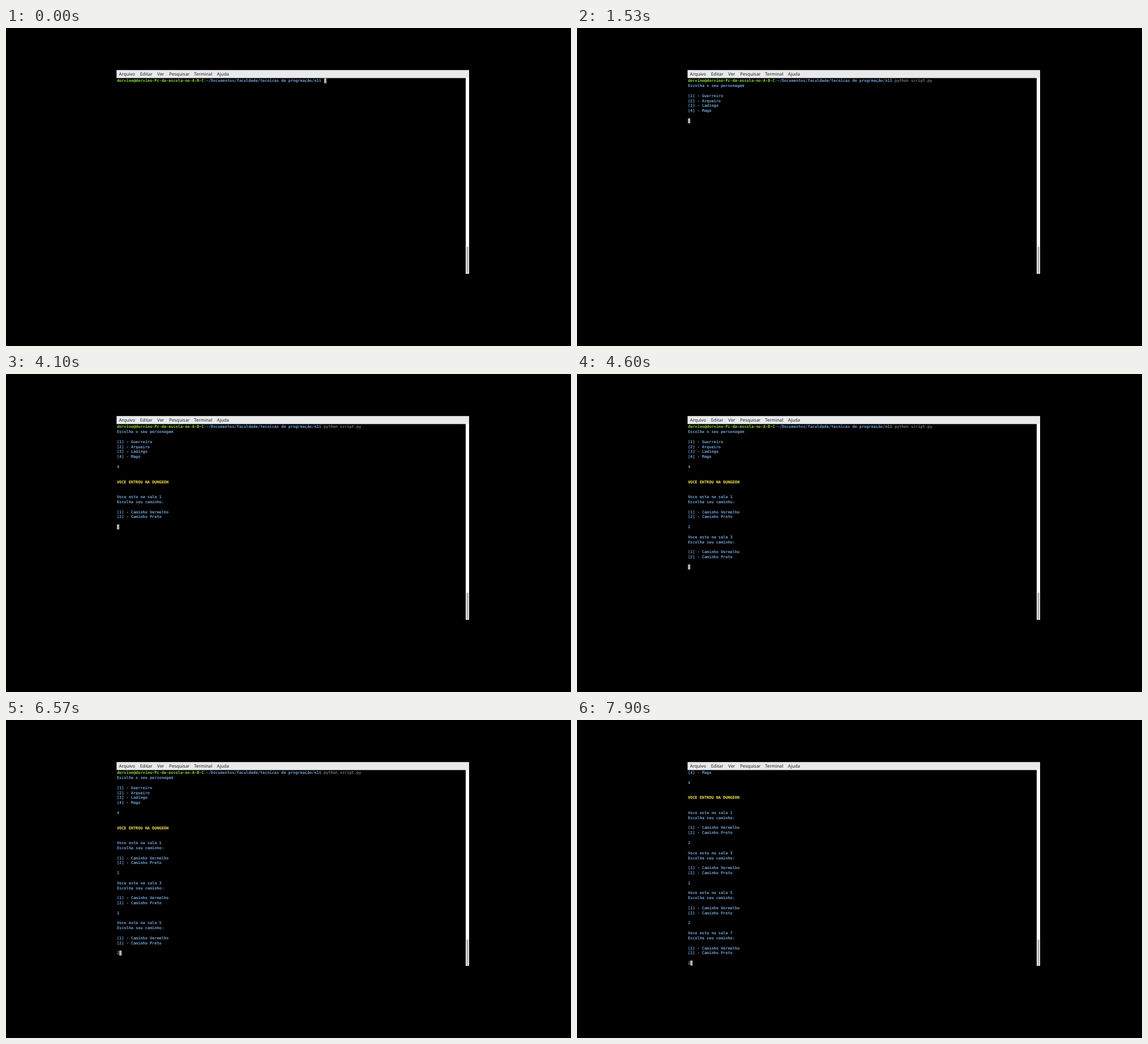
Animation of 998x561 px, one loop 8 s. Source, as an HTML page:

```html
<!DOCTYPE html>
<html lang="pt">
<head>
<meta charset="utf-8">
<title>Terminal</title>
<style>
  html, body { margin: 0; width: 100%; height: 100%; overflow: hidden; background: #000; }
  svg { display: block; width: 998px; height: 561px; }
  text { white-space: pre; text-rendering: geometricPrecision; }
  .menu { font: 7.9px "Noto Sans", "Open Sans", sans-serif; fill: #202020; }
  .row { font: bold 6.907px "DejaVu Sans Mono", monospace; fill: #729fcf; }
  .row .user { fill: #8ae234; }
  .row .plain { fill: #aaa; font-weight: normal; }
  .row.gold { fill: #fce94f; }
</style>
</head>
<body>
<svg id="stage" viewBox="0 0 998 561">
  <defs><clipPath id="view"><rect x="195" y="88.3" width="617" height="345.3"/></clipPath></defs>
  <rect width="998" height="561" fill="#000"/>
  <rect x="195.3" y="74.2" width="622.7" height="14.1" fill="#e8e9eb"/>
  <rect x="812" y="88" width="6" height="345.6" fill="#fff"/>
  <rect id="thumb" x="813.2" width="3.6" rx="1.8" fill="#b5b5b5"/>
  <g id="menu"></g>
  <g clip-path="url(#view)"><g id="screen"><rect id="cursor" fill="#b0b2af"/></g></g>
</svg>
<script>
const LOOP = 8000, CELL = 4.158, LINE = 8.837, LEFT = 195.9, TOP = 88.6;
const SCROLL_AT = 6600, SCROLL_ROWS = 6, THUMB_AT = 6500;
const $ = id => document.getElementById(id);

function add(parent, tag, attrs, content = "") {
  const el = document.createElementNS("http://www.w3.org/2000/svg", tag);
  for (const key in attrs) el.setAttribute(key, attrs[key]);
  el.textContent = content;
  parent.appendChild(el);
  return el;
}

[["Arquivo", 199.4], ["Editar", 236.7], ["Ver", 267.1], ["Pesquisar", 288.1],
 ["Terminal", 332], ["Ajuda", 372.6]].forEach(([label, x]) =>
  add($("menu"), "text", { class: "menu", x, y: 83.9 }, label));

const shown = [];
function print(row, at, content, style = "") {
  const el = add($("screen"), "text",
    { class: "row " + style, x: LEFT, y: TOP + row * LINE + 6.7 }, content);
  shown.push({ el, at });
  return el;
}

const prompt = print(0, 0, "");
[["user", "dorvino@dorvino-Pc-da-escola-no-A-B-C"], ["plain", ":"],
 ["path", "~/Documentos/faculdade/tecnicas de progrmação/n1"], ["plain", "$ "]]
  .forEach(([style, part]) => add(prompt, "tspan", { class: style }, part));
const command = add(prompt, "tspan", { class: "plain" }, "python script.py");
shown.push({ el: command, at: 570 });

print(1, 1500, "Escolha o seu personagem");
["Guerreiro", "Arqueiro", "Ladingo", "Mago"].forEach((name, i) =>
  print(3 + i, 1500, `[${i + 1}] - ${name}`));
print(8, 2800, "4");
print(11, 3270, "VOCE ENTROU NA DUNGEON", "gold");

// room number, first row, print time, answer time
[[1, 14, 3270, 4130], [3, 22, 4330, 5000], [5, 30, 5370, 6300], [7, 38, 6600, 7700]]
  .forEach(([room, row, at, answer]) => {
    print(row, at, `Voce esta na sala ${room}`);
    print(row + 1, at, "Escolha seu caminho:");
    print(row + 3, at, "[1] - Caminho Vermelho");
    print(row + 4, at, "[2] - Caminho Preto");
    print(row + 6, answer, "2");
  });

// time, column, row, visible
const cursorSteps = [
  [0, 88, 0, 1], [570, 104, 0, 1], [1130, 104, 0, 0],
  [1500, 0, 8, 1], [2100, 0, 8, 0], [2700, 0, 8, 1], [2800, 1, 8, 1],
  [3270, 0, 20, 1], [3870, 0, 20, 0], [4100, 0, 20, 1], [4130, 1, 20, 1],
  [4330, 0, 28, 1], [5000, 1, 28, 1],
  [5370, 0, 36, 1], [5930, 0, 36, 0], [6300, 1, 36, 1],
  [6600, 0, 44, 1], [7170, 0, 44, 0], [7700, 1, 44, 1]
];
const cursor = $("cursor");
cursor.setAttribute("width", CELL);
cursor.setAttribute("height", LINE);

function draw(t) {
  for (const { el, at } of shown) el.style.display = t >= at ? "" : "none";

  const [, col, row, on] = cursorSteps.findLast(step => step[0] <= t);
  cursor.setAttribute("x", LEFT + col * CELL);
  cursor.setAttribute("y", TOP + row * LINE);
  cursor.style.display = on ? "" : "none";

  const shift = t >= SCROLL_AT ? -SCROLL_ROWS * LINE : 0;
  $("screen").setAttribute("transform", `translate(0 ${shift})`);

  const top = t >= THUMB_AT ? 387 : 385.5;
  $("thumb").setAttribute("y", top);
  $("thumb").setAttribute("height", 432.8 - top);
}

const start = performance.now();
function tick(now) {
  draw(Math.max(0, now - start) % LOOP);
  requestAnimationFrame(tick);
}
draw(0);
requestAnimationFrame(tick);
</script>
</body>
</html>
```
